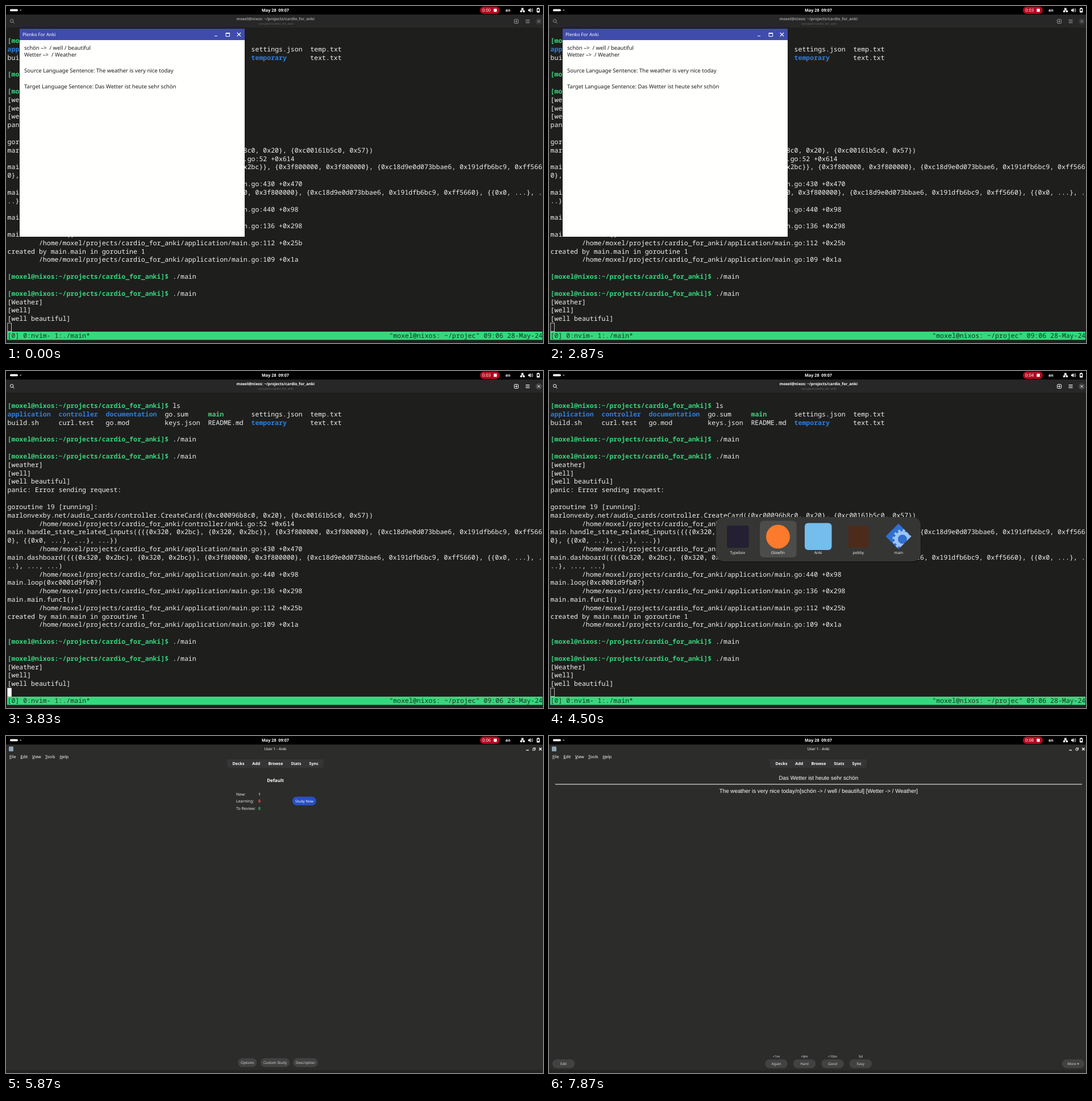
These frames come from a looping animation (945 by 593 pixels, 8 s). An HTML page:

```html
<!DOCTYPE html>
<html lang="en">
<head>
<meta charset="utf-8">
<title>Desktop recording</title>
<style>
  html, body { margin: 0; width: 100%; height: 100%; overflow: hidden; background: #000; }
  svg { display: block; width: 945px; height: 593px; }
  text { white-space: pre; text-rendering: geometricPrecision; font-family: "Noto Sans", sans-serif; fill: #fff; }
  .mono { font: 11.545px "Noto Sans Mono", monospace; fill: #f2f2f2; }
  .green { fill: #35d67b; font-weight: 700; }
  .blue { fill: #2a7fe0; font-weight: 700; }
  .dejavu { font-family: "DejaVu Sans", sans-serif; }
  .card { font: 9.84px "Liberation Sans", Arial, sans-serif; }
  .line { fill: none; stroke: #fff; stroke-width: 1; }
</style>
</head>
<body>
<svg id="stage" viewBox="0 0 945 593"></svg>
<script>
const USER = 'moxel';
const COL = 6.926, ROW = 14.83, LEFT = 2.6;

const text = (x, y, size, str, attrs = '') =>
  `<text x="${x}" y="${y}" font-size="${size}" ${attrs}>${str}</text>`;
const mid = (x, y, size, str, attrs = '') => text(x, y, size, str, 'text-anchor="middle" ' + attrs);
const rect = (x, y, w, h, fill, r = 0, attrs = '') =>
  `<rect x="${x}" y="${y}" width="${w}" height="${h}" rx="${r}" fill="${fill}" ${attrs}/>`;
const path = (d, attrs = '') => `<path class="line" d="${d}" ${attrs}/>`;
const group = (id, body, attrs = '') => `<g id="${id}" ${attrs}>${body}</g>`;
const span = (cls, str) => `<tspan class="${cls}">${str}</tspan>`;
const pill = (cx, cy, w, label, fill = '#424242', color = '#d4d4d4') =>
  rect(cx - w / 2, cy - 7.7, w, 15.4, fill, 7.7) + mid(cx, cy + 2.3, 6.3, label, `style="fill:${color}"`);

function topPanel() {
  return rect(0, 0, 945, 15, '#000') +
    rect(7, 5.5, 14, 3.8, '#fff', 1.9) + '<circle cx="25.7" cy="7.4" r="1.4" fill="#777"/>' +
    mid(474, 10, 7.25, 'May 28  09:07', 'font-weight="700"') +
    rect(834, 1, 35, 13, '#b3081f', 6.5) +
    text(838, 10.1, 7.6, '0:00', 'id="clock" font-weight="500"') +
    rect(858.3, 4.8, 5.4, 5.4, '#fff', .6) +
    mid(883.3, 10, 7, 'en', 'font-weight="600"') +
    rect(907, 3.5, 3.6, 3.3, '#fff') + rect(905, 8, 3.3, 3, '#fff') + rect(909.6, 8, 3.3, 3, '#fff') +
    path('M906.6 8V7.2H911.2V8') +
    '<path d="M919 6h1.8l2.4-2.2v7.4L920.8 9H919z" fill="#fff"/>' +
    path('M924.4 5.5q1.4 2 0 4M925.8 4q2.4 3.5 0 7', 'style="stroke-width:.8"') +
    rect(933.9, 4, 5.4, 7.6, '#fff', 1) + rect(935.4, 3, 2.4, 1.4, '#fff') + rect(935.2, 5.6, 2.8, 3, '#000');
}

function terminal() {
  const prompt = cmd => span('green', `[${USER}@nixos:~/projects/cardio_for_anki]$`) + ' ' + cmd;
  const blue = s => span('blue', s);
  const trace = at => `        /home/${USER}/projects/cardio_for_anki/${at}`;
  const state = '({{{0x320, 0x2bc}, {0x320, 0x2bc}}, {0x3f800000, 0x3f800000}, {0xc18d9e0d073bbae6, 0x191dfb6bc9, 0xff566';
  const lines = [
    prompt('ls'),
    `${blue('application')}  ${blue('controller')}  ${blue('documentation')}  go.sum     ${span('green', 'main')}       settings.json  temp.txt`,
    `build.sh     curl.test   go.mod         keys.json  README.md  ${blue('temporary')}      text.txt`,
    '',
    prompt('./main'),
    '',
    prompt('./main'),
    '[weather]',
    '[well]',
    '[well beautiful]',
    'panic: Error sending request:',
    '',
    'goroutine 19 [running]:',
    'marlonvexby.net/audio_cards/controller.CreateCard({0xc00096b8c0, 0x20}, {0xc00161b5c0, 0x57})',
    trace('controller/anki.go:52 +0x614'),
    'main.handle_state_related_inputs' + state,
    '0}, {{0x0, ...}, ...}, ...})',
    trace('application/main.go:430 +0x470'),
    'main.dashboard' + state + '0}, {{0x0, ...}, .',
    '..}, ..., ...)',
    trace('application/main.go:440 +0x98'),
    'main.loop(0xc0001d9fb0?)',
    trace('application/main.go:136 +0x298'),
    'main.main.func1()',
    trace('application/main.go:112 +0x25b'),
    'created by main.main in goroutine 1',
    trace('application/main.go:109 +0x1a'),
    '',
    prompt('./main'),
    '',
    prompt('./main'),
    '[Weather]',
    '[well]',
    '[well beautiful]'
  ];
  const row = (i, str, col = 0, style = '') =>
    `<text class="mono" x="${LEFT + col * COL}" y="${64.9 + i * ROW}" ${style}>${str}</text>`;
  const dark = 'style="fill:#123522"';
  const header =
    mid(474.3, 25, 6.85, `${USER}@nixos: ~/projects/cardio_for_anki`, 'font-weight="700"') +
    '<circle class="line" cx="10.2" cy="26.2" r="2.7"/>' + path('M12.2 28.3L14.6 30.7') +
    '<rect class="line" x="894.5" y="23.5" width="7" height="7" rx="1"/>' + path('M896 27h4M898 25v4') +
    path('M914.5 24.5h7M914.5 27h7M914.5 29.5h7') +
    '<circle cx="937.5" cy="27" r="5.8" fill="#fff" opacity=".13"/>' + path('M935.3 24.8l4.4 4.4M939.7 24.8l-4.4 4.4');
  return rect(0, 15, 945, 578, '#1e1e1d') + rect(0, 15, 945, 23, '#272727') +
    group('header', header) +
    mid(474, 33.2, 5.25, '~/projects/cardio_for_anki', 'style="fill:#646464"') +
    lines.map((str, i) => row(i, str)).join('') +
    rect(2, 573, 942, 14.5, '#37d87d') +
    row(35, '[0] 0:nvim- 1:./main*', 0, dark) +
    row(35, `"${USER}@nixos: ~/projec" 09:06 28-May-24`, 97, dark) +
    rect(2.8, 558, 6.8, 14.7, 'none', 0, 'id="cursor" stroke="#e8e8e8" stroke-width=".8"');
}

function appWindow() {
  const body = (y, str) => text(32, y, 9.57, str, 'style="fill:#1c1c1c"');
  return rect(24, 40, 396, 366, '#fffffe') + rect(24, 40, 396, 20, '#3f4cac') +
    text(29, 53, 8, 'Plenko For Anki') +
    path('M367 52.8h5') + path('M387 47.5h6.5v6h-6.5z') + path('M387 48h6.5', 'style="stroke-width:2"') +
    path('M406.7 47l6.4 6.4M413.1 47l-6.4 6.4', 'style="stroke-width:1.2"') +
    body(77.2, 'schön –&gt;  / well / beautiful') +
    body(89.2, 'Wetter –&gt;  / Weather') +
    body(116.8, 'Source Language Sentence: The weather is very nice today') +
    body(144.6, 'Target Language Sentence: Das Wetter ist heute sehr schön');
}

function deckApp() {
  const menu = [[6, 'File'], [25.5, 'Edit'], [46, 'View'], [69, 'Tools'], [94.5, 'Help']]
    .map(([x, s]) => text(x, 38.5, 7.2, `<tspan text-decoration="underline">${s[0]}</tspan>${s.slice(1)}`, 'font-weight="500"'));
  const tools = [[409, 'Decks'], [440.3, 'Add'], [474.4, 'Browse'], [510.5, 'Stats'], [541.7, 'Sync']]
    .map(([x, s]) => mid(x, 51.4, 7.1, s, 'font-weight="700"'));
  const deckButtons = pill(424.7, 574.7, 33, 'Options') + pill(473.5, 574.7, 51, 'Custom Study') + pill(527, 574.7, 43.5, 'Description');

  const big = (y, s) => text(363, y, 18.5, s, 'class="dejavu"');
  const small = (y, s) => text(363, y, 7.41, s, 'class="dejavu"');
  const finished = big(97.8, 'Congratulations! You') + big(120.2, 'have finished this deck') + big(142.6, 'for now.') +
    small(162.7, 'If you wish to study outside of the regular schedule, you') +
    small(174, 'can use the <tspan fill="#b4d2f2">custom study</tspan> feature.') + deckButtons;

  const count = (y, label, n, color) => text(405, y, 7, label, 'style="fill:#e8e8e8"') +
    text(444, y, 7, n, `font-weight="700" style="fill:${color}"`);
  const overview = mid(474, 81.2, 8, 'Default', 'font-weight="700"') +
    count(104.7, 'New:', 1, '#84b9f8') + count(117.1, 'Learning:', 0, '#f2625d') + count(129.5, 'To Review:', 0, '#2fc463') +
    pill(525, 114.4, 42, 'Study Now', '#2850c4', '#fff') + deckButtons;

  const grade = (x, due, label) => mid(x, 565.8, 6, due, 'style="fill:#ddd"') + pill(x, 576.7, 39.5, label);
  const question = mid(474.3, 565.8, 6.2,
    '<tspan fill="#84b9f8" text-decoration="underline">1</tspan> + <tspan fill="#f2625d">0</tspan> + <tspan fill="#2fc463">0</tspan>') +
    pill(474.3, 576.7, 50, 'Show Answer');
  const answer = rect(11, 84.4, 927, 1.1, '#ececec') +
    `<text class="card" text-anchor="middle" x="474.3" y="99.5">The weather is very nice today/n[schön -&gt; / well / beautiful] [Wetter -&gt; / Weather]</text>` +
    grade(400, '&lt;1m', 'Again') + grade(449.5, '&lt;6m', 'Hard') + grade(499, '&lt;10m', 'Good') + grade(548.3, '5d', 'Easy');

  return rect(0, 15, 945, 578, '#2c2c2b') + rect(0, 588, 945, 5, '#242322') +
    rect(5, 18.5, 8, 8.5, '#8fa6b3', 1) +
    mid(474, 25.3, 6.6, 'User 1 - Anki', 'font-weight="500"') +
    path('M915.3 25h4.8', 'style="stroke-width:1.3"') + path('M927 22.3h3.6v3h-3.6zM928 22v-1.2h3.6v3h-1', 'style="stroke-width:.8"') +
    path('M938.2 20.8l4.4 4.4M942.6 20.8l-4.4 4.4', 'style="stroke-width:1.3"') +
    menu.join('') + `<path d="M389 41h170v11q0 4-4 4H393q-4 0-4-4z" fill="#353535"/>` + tools.join('') +
    group('finished', finished) + group('overview', overview) +
    group('study', pill(25.6, 576.7, 39.5, 'Edit') + pill(922.5, 576.7, 39.5, 'More ▾')) +
    group('question', question) +
    group('front', `<text class="card" text-anchor="middle" x="474.3" y="77">Das Wetter ist heute sehr schön</text>`) +
    group('answer', answer);
}

function switcher() {
  const labels = ['Typebox', 'Glowfin', 'Anki', 'pebby', 'main'];
  const gear = '<g clip-path="url(#diamond)"><circle cx="622" cy="296" r="11" fill="none" stroke="#9cc4f5" stroke-width="6"/>' +
    '<circle cx="622" cy="296" r="15.5" fill="none" stroke="#9cc4f5" stroke-width="4" stroke-dasharray="4.1 4"/></g>';
  const diamond = '<path id="tile" d="M615 268.5l22.5 22.5L615 313.5 592.5 291z" fill="#2f6fd0"/>';
  return `<defs><clipPath id="diamond"><use href="#tile"/></clipPath></defs>` +
    rect(294, 259, 361, 78, '#000', 14, 'opacity=".25"') +
    rect(294, 257, 360, 78, '#353534', 14) +
    rect(371, 263.5, 64.5, 64.5, '#4c4c4b', 7, 'id="highlight"') +
    rect(313, 272, 38.5, 39, '#241f31', 3) +
    '<circle cx="403" cy="291.5" r="21" fill="#fb7a2c"/>' +
    rect(450, 267.5, 47.5, 47.5, '#74bdec', 6) +
    rect(526.5, 272, 36, 39, '#4d2b1b', 3) +
    diamond + gear +
    labels.map((s, i) => mid(332 + i * 70.8, 322.3, 6.8, s, 'style="fill:#ececec"')).join('');
}

const $ = id => document.getElementById(id);
$('stage').innerHTML = group('terminal', terminal()) + group('app', appWindow()) +
  group('deck', deckApp()) + group('switcher', switcher()) + topPanel();

const show = (id, on) => $(id).setAttribute('display', on ? 'inline' : 'none');
const ramp = (t, from, to) => Math.min(1, Math.max(0, (t - from) / (to - from)));

const MINIMIZE = 3370, GRAB = 4330, POPUP = 4500, NEXT = 4860, ACTIVATE = 5230,
  REFRESH = 5320, STUDY = 6070, REVEAL = 7630;

function draw(t) {
  $('clock').textContent = '0:0' + Math.floor((t + 130) / 1000);

  show('terminal', t < ACTIVATE);
  $('header').setAttribute('opacity', t < MINIMIZE ? .52 : 1);
  $('cursor').setAttribute('fill', t >= MINIMIZE && t < GRAB ? '#fff' : 'none');

  // The window shrinks into the top left corner on an exponential ease-in.
  const shrink = t < MINIMIZE ? 0 : 2 ** (10 * (ramp(t, 3192, 3592) - 1));
  show('app', shrink < 1);
  $('app').setAttribute('transform', `scale(${1 - shrink})`);
  $('app').setAttribute('opacity', 1 - shrink);

  show('switcher', t >= POPUP && t < 5400);
  $('switcher').setAttribute('opacity', 1 - ramp(t, 5260, 5390));
  $('highlight').setAttribute('x', t < NEXT ? 371 : 441.7);

  show('deck', t >= ACTIVATE);
  show('finished', t < REFRESH);
  show('overview', t >= REFRESH && t < STUDY);
  show('study', t >= STUDY);
  show('question', t >= STUDY && t < REVEAL);
  $('front').setAttribute('opacity', ramp(t, STUDY + 30, STUDY + 140));
  show('answer', t >= REVEAL);
}

function tick() {
  draw(performance.now() % 8000);
  requestAnimationFrame(tick);
}
tick();
</script>
</body>
</html>
```
